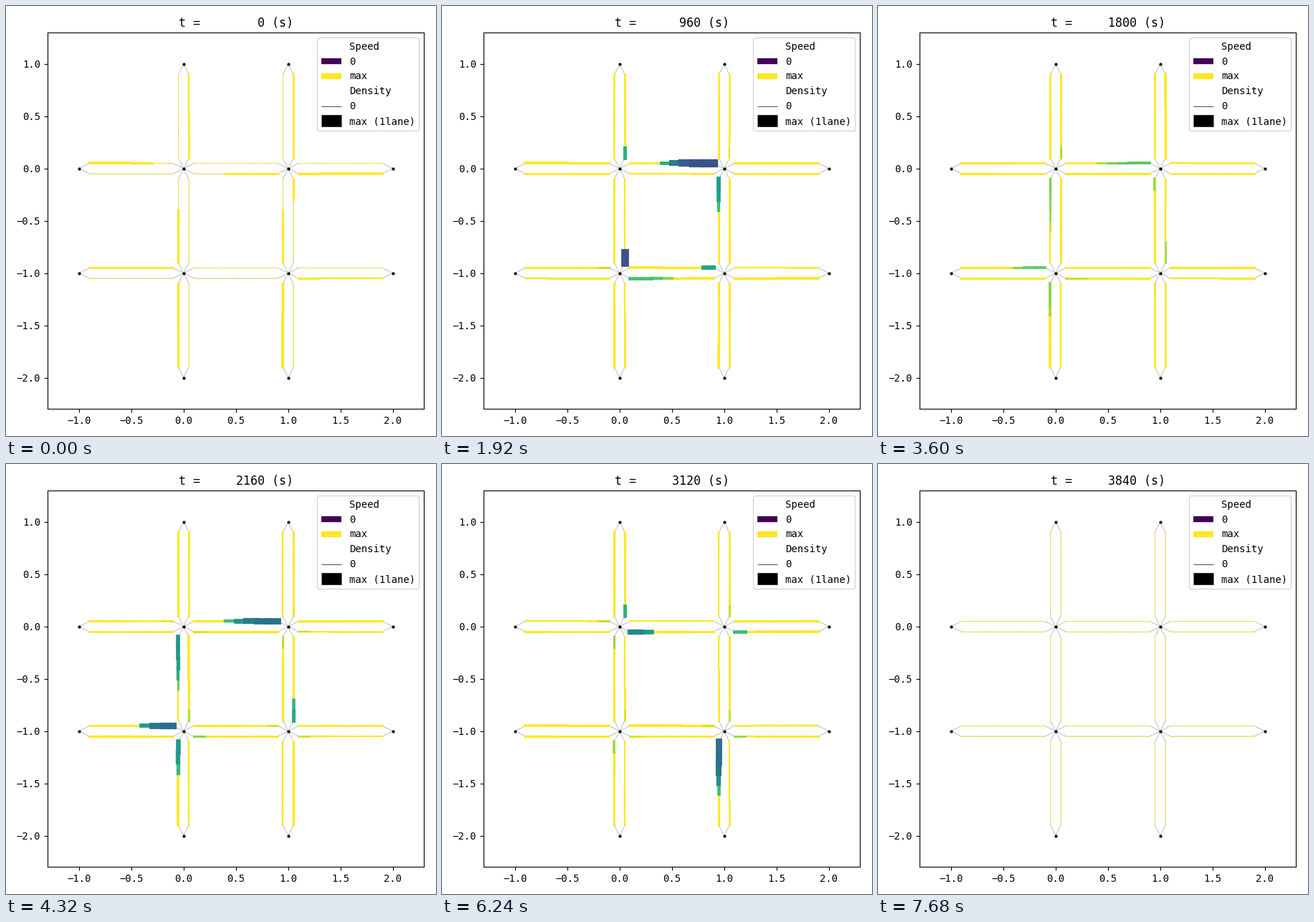
These frames come from a looping animation (600 by 600 pixels, 7.92 s). A matplotlib script:

```python
import matplotlib.pyplot as plt
import numpy as np
from matplotlib.animation import FuncAnimation
from matplotlib.lines import Line2D

plt.rcParams["font.family"] = "DejaVu Sans Mono"

FRAMES, STEP = 33, 120
CELLS = 8          # coloured cells per link
PT = 0.72          # points per pixel
LAST_ENTRY = 29    # no vehicle enters after this step
FADE = 5           # steps a jam takes to build up or dissolve
VIRIDIS = plt.colormaps["viridis"]

# Heading + street (T/B rows, L/R columns): cells reached in the first step
ROADS = {"ET": 6, "WT": 13, "EB": 8, "WB": 8, "NL": 13, "SL": 8, "NR": 13, "SR": 10}

# Main jams per link: (time in s, length in cells, relative speed at the head)
JAMS = {
    "ET0": [(360, 1, .42)],
    "ET1": [(360, 7, .43), (960, 5, .25), (1440, 3, .7), (2160, 5, .37)],
    "EB0": [(2160, 3, .36)],
    "EB1": [(960, 1, .58)],
    "WT1": [(3120, 2, .48)],
    "WT2": [(3120, 1, .68)],
    "WB1": [(360, 1, .58), (960, 4, .7), (1440, 2, .8)],
    "NL0": [(2160, 3, .54)],
    "NL1": [(2160, 5, .53)],
    "NR0": [(3120, 5, .36)],
    "NR1": [(960, 3, .56)],
    "SL1": [(960, 1, .25)],
    "SL2": [(960, 1, .64), (3120, 1, .64)],
    "SR1": [(360, 1, .72), (2160, 2, .62)],
}


def ends(road, block):
    heading, street = road
    if heading in "EW":
        y = 0 if street == "T" else -1
        pair = (block - 1, y), (block, y)
    else:
        x = 0 if street == "L" else 1
        pair = (x, block - 2), (x, block - 1)
    return np.array(pair if heading in "EN" else pair[::-1], float)


def history(road, block, rng):
    """Line width (px) and relative speed for every step and cell of a link."""
    steps = np.arange(FRAMES)[:, None]
    cell = np.arange(CELLS)
    order = block if road[0] in "EN" else 2 - block
    place = order * CELLS + cell

    # Platoons fill the road from its entry and leave it at the end
    flow = rng.uniform(2.3, 3.5, (FRAMES, 1))
    lag = cell < rng.integers(2, 7, (FRAMES, 1))
    flow = flow + lag * rng.uniform(-.5, .5, (FRAMES, 1))
    front = ROADS[road] + 3 * CELLS * steps
    rear = CELLS * (steps - LAST_ENTRY)
    present = (place < front) & (place >= rear)

    # Brief slowdowns at the junctions, then the jams, slowest at the head
    slow = np.zeros((FRAMES, CELLS))
    if order < 2:
        slow[2:LAST_ENTRY, -1] = .2 * np.maximum(rng.uniform(-1, 1, LAST_ENTRY - 2), 0)
    back = CELLS - 1 - cell
    for time, length, speed in JAMS.get(f"{road}{block}", []):
        rise = np.clip(1 - abs(steps - time / STEP) / FADE, 0, 1)
        shape = np.clip(1 - (back / length) ** 3, 0, 1)
        slow = np.maximum(slow, rise * (1 - speed) * shape)
    return present * (flow + 15 * slow ** 2), 1 - present * slow


fig = plt.figure(figsize=(6, 6), dpi=100)
ax = fig.add_axes([58.1 / 600, 37.6 / 600, 525.3 / 600, 525.3 / 600])
ax.set_xlim(-1.3, 2.3)
ax.set_ylim(-2.3, 1.3)
title = ax.set_title("")

links = []
rng = np.random.default_rng(4)
for road in ROADS:
    for block in range(3):
        a, b = ends(road, block)
        dx, dy = b - a
        side = 0.05 * np.array([-dy, dx])
        mid = [a + (b - a) * i / 10 + side for i in range(1, CELLS + 2)]
        ax.plot(*np.array([a, *mid, b]).T, "k--", lw=0.25, zorder=5)
        cells = [ax.plot(*np.array(mid[i:i + 2]).T, zorder=6)[0] for i in range(CELLS)]
        links.append((cells, *history(road, block, rng)))

for x in range(-1, 3):
    for y in range(-2, 2):
        if x in (0, 1) or y in (0, -1):
            ax.plot(x, y, "ko", ms=2, zorder=10)


def key(label, color="k", lw=1.0, alpha=1):
    return Line2D([], [], color=color, lw=lw, alpha=alpha, label=label,
                  solid_capstyle="butt")


ax.legend(handles=[
    key("Speed", alpha=0), key("0", VIRIDIS(0.0), 6), key("max", VIRIDIS(1.0), 6),
    key("Density", alpha=0), key("0", lw=0.5), key("max (1lane)", lw=12),
], loc="upper right").set_zorder(20)


def draw(f):
    title.set_text(f"t = {f * STEP:>8} (s)")
    for cells, width, speed in links:
        for line, w, v in zip(cells, width[f], speed[f]):
            line.set_linewidth(max(w * PT, 0.5))
            line.set_color(VIRIDIS(float(v)))
    return []


anim = FuncAnimation(fig, draw, frames=FRAMES, interval=240, repeat=True, repeat_delay=0)
plt.show()
```
